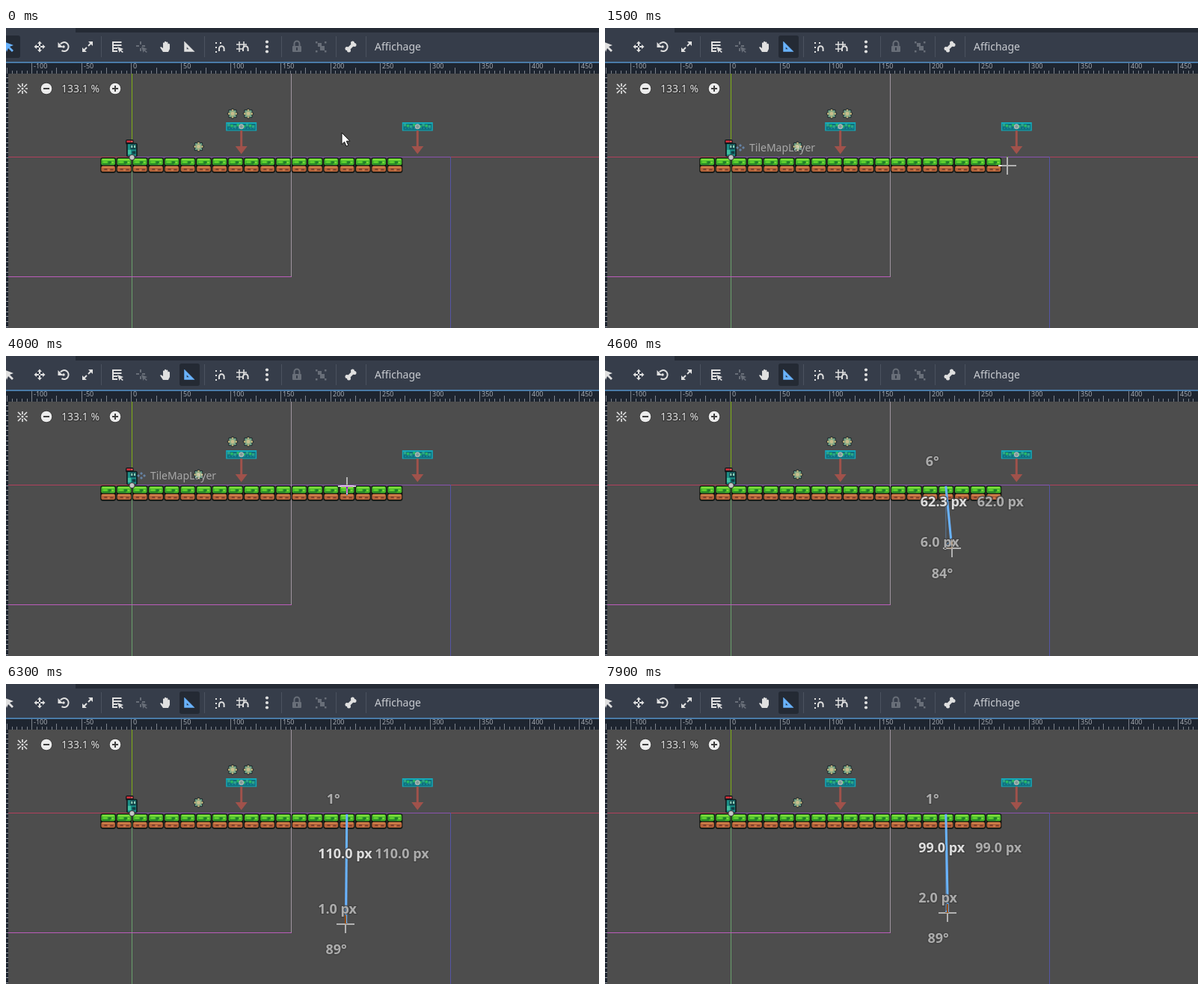
These frames come from a looping animation (793x401 px, 8000 ms). An HTML page with a canvas:

```html
<!DOCTYPE html>
<html lang="fr">
<head>
<meta charset="utf-8">
<title>Mesure</title>
<style>
html, body { margin: 0; width: 100%; height: 100%; overflow: hidden; background: #4d4d4d; }
canvas { display: block; }
</style>
</head>
<body>
<canvas id="stage" width="793" height="401"></canvas>
<script>
const c = document.getElementById('stage').getContext('2d');
const LOOP = 8000, ZOOM = 1.331, OX = 168.3, OY = 172.5;
const BEGIN = { x: 455.8, y: 173.9 };
const BLUE = '#69b3ff', LIGHT = '#e0e0e0', FONT = '"Noto Sans", "Open Sans", sans-serif';

// [time, x, y] for the pointer, then [time, dx, dy] in scene units for the drag
const POINTER = [[0, 449, 140], [100, 430, 125], [300, 320, 62], [500, 252, 28], [600, 245, 26],
  [1000, 245, 26], [1200, 320, 75], [1500, 538, 184], [1700, 550, 180], [1900, 555, 177],
  [2000, 555, 176], [2300, 555, 176], [2500, 480, 178], [2600, 453, 177], [3200, 453, 177],
  [3400, 455, 176], [3900, 455, 176], [4000, 456, 174]];
const DRAG = [[4200, 0, 1], [4300, 1, 6], [4600, 6, 62], [4700, 9, 74], [5100, -1, 97], [5200, -2, 100],
  [5300, -5, 101], [5400, -7, 105], [5600, -4, 109], [5700, -4, 109], [5900, -1, 110], [6400, -1, 110],
  [6600, 2, 101], [7000, 2, 101], [7100, 4, 100], [7200, 4, 100], [7300, 3, 99], [7500, 3, 99],
  [7600, 3, 98], [7700, 3, 98], [7900, 2, 99]];

function at(keys, t) {
  const i = keys.findIndex(k => k[0] > t);
  if (i < 0) return keys[keys.length - 1].slice(1);
  if (i === 0) return keys[0].slice(1);
  const a = keys[i - 1], b = keys[i], f = (t - a[0]) / (b[0] - a[0]);
  return [a[1] + (b[1] - a[1]) * f, a[2] + (b[2] - a[2]) * f];
}

function rect(color, x, y, w, h) {
  c.fillStyle = color;
  c.fillRect(x, y, w, h);
}
function round(color, x, y, w, h, r) {
  c.fillStyle = color;
  c.beginPath();
  c.roundRect(x, y, w, h, r);
  c.fill();
}
function dot(color, x, y, r) {
  c.fillStyle = color;
  c.beginPath();
  c.arc(x, y, r, 0, 7);
  c.fill();
}
function path(d, x, y, fill, stroke, width = 2) {
  const p = new Path2D(d);
  c.save();
  c.translate(x, y);
  if (fill) { c.fillStyle = fill; c.fill(p); }
  if (stroke) { c.strokeStyle = stroke; c.lineWidth = width; c.stroke(p); }
  c.restore();
}
function text(s, x, y, size, color, weight = 400, outline) {
  c.font = `${weight} ${size}px ${FONT}`;
  if (outline) {
    c.strokeStyle = outline;
    c.lineWidth = 3;
    c.lineJoin = 'round';
    c.strokeText(s, x, y);
  }
  c.fillStyle = color;
  c.fillText(s, x, y);
}
// Runs draw in scene pixels with its origin at stage position x, y
function sprite(x, y, draw) {
  c.save();
  c.translate(x, y);
  c.scale(ZOOM, ZOOM);
  draw();
  c.restore();
}

function tile() {
  round('#101410', 0.2, 0.3, 15.6, 15.6, 2.5);
  round('#43b52b', 1, 1.2, 14, 6.8, 1.5);
  rect('#83e03c', 2, 1.8, 12, 1.6);
  rect('#5fd02f', 3, 4, 4, 2);
  rect('#1f7a2b', 8, 4.2, 3, 2);
  rect('#1f7a2b', 2, 6.4, 8, 1);
  rect('#83e03c', 11.5, 4.6, 2, 1.4);
  round('#b4633a', 1, 9, 14, 5.6, 1.5);
  rect('#d98a4e', 2, 9.4, 12, 1.2);
  rect('#73392c', 4, 11.6, 3, 1.2);
  rect('#73392c', 10, 12, 3, 1.2);
  rect('#c9774a', 7.4, 12.2, 2, 1.6);
}

function platform(x) {
  rect('#14a9b8', x - 20.5, 126, 41, 11.5);
  rect('#0f6f7c', x - 19, 128, 38, 8.5);
  for (let i = 0; i < 9; i++) {
    rect(i % 2 ? '#28b866' : '#2fa58a', x - 18.5 + i * 4.1, 128 + i % 3, 3.4, 3.5);
    rect('#18879a', x - 17 + i * 4.1, 133, 2, 2);
  }
  dot('#a9b9b5', x, 131.7, 3.5);
  dot('#7f9a98', x, 131.7, 2);
  rect('#a0524b', x - 1.5, 137, 3, 22);
  path('M-8 0H8L0 10.5Z', x, 158, '#a0524b');
}

function gear(x, y) {
  dot('#20343a', x, y, 6);
  for (let i = 0; i < 8; i++) {
    const a = i * Math.PI / 4;
    dot('#1c2b2e', x + 5.6 * Math.cos(a), y + 5.6 * Math.sin(a), 1.7);
    dot(i % 2 ? '#6fa48b' : '#c9b27a', x + 4.6 * Math.cos(a), y + 4.6 * Math.sin(a), 1.5);
  }
  dot('#8fae86', x, y, 4.2);
  dot('#c8bd8c', x, y, 2.4);
}

function player() {
  round('#10181b', -6.2, -18, 8, 5, 1.5);
  rect('#d32f3c', -5.2, -17, 4, 2);
  rect('#f0565a', -1, -16.8, 2, 1.6);
  round('#10181b', -5.4, -14.5, 11, 14, 1.5);
  rect('#1c8f88', -4.2, -13.4, 8.6, 12);
  rect('#0c3d44', -1.5, -13, 5.5, 5);
  rect('#8fd0b8', -0.8, -12.2, 1.6, 2.6);
  rect('#8fd0b8', 2, -12.2, 1.6, 2.6);
  rect('#3fc0a0', -4, -7.6, 3, 4.5);
  rect('#123f44', 0.2, -6.4, 3.6, 3);
}

function scene() {
  rect('#4d4d4d', 0, 0, 793, 401);
  rect('#b1405c', 3, 172, 790, 1);
  rect('#7fb016', 168, 61, 1, 112);
  rect('#69a06d', 168, 173, 1, 228);
  rect('#8a52b0', 168, 172, 427, 1);
  rect('#5555a4', 594, 172, 1, 229);
  rect('#9e949e', 381, 61, 1, 272);
  rect('#bb5cbb', 3, 332, 379, 1);
  for (let i = 0; i < 19; i++) sprite(126 + i * 16 * ZOOM, 172.6, tile);
  platform(314.7);
  platform(550.3);
  gear(303, 114.5);
  gear(324, 114.5);
  gear(257.5, 158.5);
  sprite(OX, 173, player);
  dot('#404040', 168.5, 173, 4);
  dot('#c4c8c8', 168.5, 173, 3);
}

function rulers(focus) {
  rect('#1e2530', 0, 45, 793, 16);
  rect('#1e2530', 0, 61, 3, 340);
  for (let u = -125; u <= 470; u += 5) {
    const x = Math.round(OX + u * ZOOM) - 1, top = u % 50 === 0 ? 47 : u % 25 === 0 ? 53 : 57;
    rect('#7d838c', x, top, 1, 61 - top);
    if (u % 50 === 0) text(String(u), x + 3, 54, 9, '#a3a8af');
  }
  for (let u = -80; u <= 170; u += 5) rect('#9a9ea5', 0, Math.round(OY + u * ZOOM), 3, 1);
  if (focus) rect('#4a7ba8', 0, 45, 793, 2);
}

function viewControls() {
  path('M-6 -6L-2 -2M6 -6L2 -2M-6 6L-2 2M6 6L2 2M0 -7V-3M0 7V3M-7 0H-4M7 0H4', 22, 81, null, LIGHT, 1.7);
  dot(LIGHT, 22, 81, 1.5);
  for (const x of [54, 146]) {
    dot('#3c3c3c', x, 81, 8.2);
    dot('#ececec', x, 81, 7.3);
    rect('#3f3f3f', x - 4, 80, 8, 2);
  }
  rect('#3f3f3f', 145, 77, 2, 8);
  text('133.1 %', 74, 86, 14, '#dedede', 400, 'rgba(50,50,50,.6)');
}

function toolbar(measuring, hover) {
  rect('#363d4a', 0, 0, 793, 45);
  rect('#252b35', 93, 0, 700, 6);
  if (measuring) round('#242a34', 232, 10, 27, 30, 3);
  else {
    round('#242a34', -10, 10, 29, 30, 3);
    if (hover) round('#424a58', 232, 10, 27, 30, 3);
  }
  const on = '#e0e0e0', off = '#686e78';
  path('M-3 -7L10 -2L5 0L10 5L8 7L3 2L1 7Z', 0, 25, measuring ? on : BLUE);
  path('M0 -7.5L3 -4H-3ZM0 7.5L3 4H-3ZM-7.5 0L-4 -3V3ZM7.5 0L4 -3V3Z', 45, 25, on);
  path('M-4 0H4M0 -4V4', 45, 25, null, on);
  dot('#363d4a', 45, 25, 1.2);
  path('M-4.2 -3.5A6 6 0 1 1 -2.5 5.2', 77, 25, null, on);
  path('M-7.5 -6V1H-0.5Z', 77, 25, on);
  dot(on, 77, 25, 1.8);
  path('M1 -7H7V-1ZM-7 1V7H-1Z', 109, 25, on);
  path('M1 -1L5 -5M-5 5L-1 1', 109, 25, null, on);
  path('M-6.5 -6H5.5M-6.5 -2H5.5M-6.5 2H0M-6.5 6H0M-6 -7V7', 149, 25, null, on);
  path('M0 0L8 3L5 4.5L8 7L6.5 8L4 5.5L2.5 8Z', 149, 25, on);
  path('M-1 -7V-3M-7 -1H-3M1 -1H5M-1 2V6', 181, 25, null, off);
  path('M0 0L8 3L5 4.5L8 7L6.5 8L4 5.5L2.5 8Z', 181, 25, off);
  path('M-3 7L-7 1Q-6 -1 -3 2V-5Q-2 -6.5 -1 -5V-1V-6.5Q0 -8 1.2 -6.5V-1V-6Q2.5 -7.3 3.5 -5.5V0V-3.5Q5 -5 6 -3V3L4 7Z', 213, 25, on);
  path('M-6.5 -7V6.5H7ZM-3.5 0L0 3.5H-3.5Z', 245, 25, null, measuring ? BLUE : on, 0.5);
  c.fillStyle = measuring ? BLUE : on;
  c.save();
  c.translate(245, 25);
  c.fill(new Path2D('M-6.5 -7V6.5H7ZM-3.5 0L0 3.5H-3.5Z'), 'evenodd');
  c.restore();
  for (const [x, y] of [[280, 20], [286, 20], [280, 26], [280, 32]]) rect(on, x, y - 1, 2, 2);
  path('M-2 6V2.5A3.3 3.3 0 0 1 4.6 2.5V6', 287, 25, null, on);
  path('M-3 -7V7M3 -7V1M-7 -3H7M-7 3H1', 315, 25, null, on, 1.5);
  path('M-2 6V2.5A3.3 3.3 0 0 1 4.6 2.5V6', 319, 25, null, on);
  for (const y of [18.5, 25, 31.5]) dot(on, 349, y, 2.1);
  round(off, 383, 24, 12, 8, 1);
  path('M-3.5 0V-3A3.5 3.5 0 0 1 3.5 -3V0', 389, 24, null, off);
  rect('#363d4a', 388, 26, 2, 4);
  for (const x of [414, 426]) for (const y of [18, 30]) rect(off, x, y, 2.5, 2.5);
  rect(off, 417, 20, 5, 5);
  rect(off, 420, 24, 6, 6);
  path('M-4 4L4 -4', 461, 25, null, on, 4);
  for (const [x, y] of [[456, 27.5], [458.5, 30], [463.5, 20], [466, 22.5]]) dot(on, x, y, 2.5);
  for (const x of [127, 265, 368, 441, 481]) rect('#4b525f', x, 11, 1, 28);
  text('Affichage', 493, 30, 14, '#c9ccd1');
}

function hint() {
  c.globalAlpha = 0.6;
  path('M0 -5L2 -3L0 -1L-2 -3ZM0 1L2 3L0 5L-2 3ZM-4 -2L-2 0L-4 2L-6 0ZM4 -2L6 0L4 2L2 0Z', 181, 160, '#78a8e0');
  text('TileMapLayer', 193, 165, 14, '#e4e4e4');
  c.globalAlpha = 1;
}

function measure(u, v) {
  const ex = BEGIN.x + u * ZOOM, ey = BEGIN.y + v * ZOOM;
  const left = (BEGIN.x + ex) / 2 - 38, mid = (BEGIN.y + ey) / 2 - 21;
  const tilt = Math.round(Math.atan2(Math.abs(u), v) * 180 / Math.PI);
  const line = (x1, y1, x2, y2, color, w) => path(`M${x1} ${y1}L${x2} ${y2}`, 0, 0, null, color, w);
  const faint = 'rgba(105,179,255,.45)';
  line(BEGIN.x, BEGIN.y, BEGIN.x, ey, faint, 1);
  line(BEGIN.x, ey, ex, ey, faint, 1);
  line(BEGIN.x, BEGIN.y, ex, ey, BLUE, 3);
  const r = Math.min(Math.abs(u) * ZOOM, 10), dir = Math.atan2(BEGIN.y - ey, BEGIN.x - ex);
  c.strokeStyle = BLUE;
  c.lineWidth = 1.5;
  c.beginPath();
  c.arc(ex, ey, r, dir, u > 0 ? Math.PI : 0, u > 0);
  c.stroke();

  const label = (s, x, y, color = '#acacac') => text(s, x, y + 6.5, 18, color, 700, 'rgba(65,65,65,.75)');
  const px = n => n.toFixed(1) + ' px';
  label(px(Math.hypot(u, v)), left, mid, '#dedede');
  label(px(v), left + 76, mid);
  label(px(Math.abs(u)), left, Math.max(mid + 54, ey - 20));
  label(90 - tilt + '°', ex - 27, ey + 34);
  label(tilt + '°', BEGIN.x - 27, Math.min(BEGIN.y - 20, mid - 54));
}

// The precision cursor inverts whatever lies below it
function cross(x, y) {
  c.globalCompositeOperation = 'difference';
  x = Math.round(x);
  y = Math.round(y);
  rect('#fff', x - 12, y - 1, 24, 2);
  rect('#fff', x - 1, y - 12, 2, 11);
  rect('#fff', x - 1, y + 1, 2, 11);
  c.globalCompositeOperation = 'source-over';
}

function draw(t) {
  const measuring = t >= 800, dragging = t >= 4300;
  const [x, y] = at(POINTER, t);
  scene();
  rulers(t < 800 || t >= 1200);
  viewControls();
  toolbar(measuring, t >= 500);
  if (t >= 1400 && t < 1700 || t >= 2500 && !dragging) hint();
  if (dragging) {
    const [u, v] = at(DRAG, t).map(Math.round);
    measure(u, v);
    cross(BEGIN.x + u * ZOOM, BEGIN.y + v * ZOOM + 0.6);
  } else if (measuring && y > 47) cross(x, y);
  else path('M0 0V15.5L3.6 12.2L6 18L8.8 16.8L6.3 11.2H11Z', x, y, '#fff', '#111', 1);
}

function loop(now) {
  draw(Math.floor(now % LOOP / 100) * 100);
  requestAnimationFrame(loop);
}
requestAnimationFrame(loop);
</script>
</body>
</html>
```
